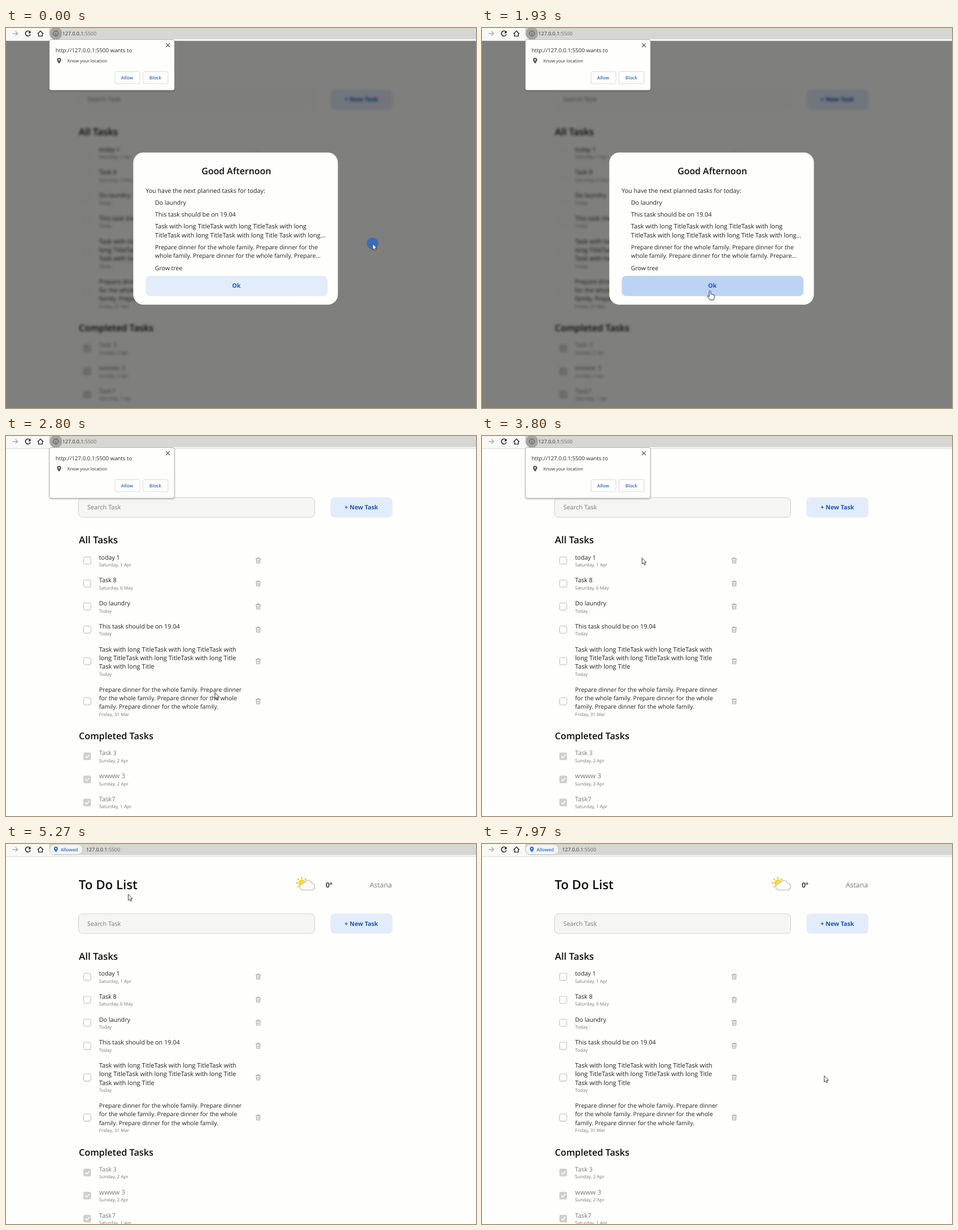
These frames come from a looping animation (832 by 673 pixels, 8000 ms). An HTML page:

```html
<!DOCTYPE html>
<html lang="en">
<head>
<meta charset="utf-8">
<title>To Do List</title>
<style>
  html, body { margin: 0; width: 100%; height: 100%; overflow: hidden; background: #fefefc; }
  svg { display: block; width: 832px; height: 673px; }
  text { font-family: "Open Sans", "Noto Sans", sans-serif; text-rendering: geometricPrecision; white-space: pre; }

  .step { animation: 8s step-end infinite; }
  .page { animation-name: blur; }
  .crisp { animation-name: crisp; }
  .modal { animation-name: modal; }
  .popup { animation-name: popup; }
  .granted { animation-name: granted; }
  .weather { animation-name: weather; }
  .title { animation-name: title; }
  .list { animation-name: list; }
  .ok { animation-name: ok; }
  .ok-text { animation-name: ok-text; }
  .allow { animation-name: allow; }
  .arrow { animation-name: arrow; }
  .hand { animation-name: hand; }
  .click { animation-name: click; }
  .cursor { animation: move 8s linear infinite; }

  @keyframes blur { 0% { filter: blur(2.2px); } 35%, to { filter: none; } }
  @keyframes crisp { 0% { opacity: .1; } 35%, to { opacity: 1; } }
  @keyframes modal { 0% { visibility: visible; } 35%, to { visibility: hidden; } }
  @keyframes popup { 0% { visibility: visible; } 62.8%, to { visibility: hidden; } }
  @keyframes granted { 0% { visibility: hidden; } 62.8%, to { visibility: visible; } }
  @keyframes weather { 0% { visibility: hidden; } 65.5%, to { visibility: visible; } }
  @keyframes title { 0% { transform: translateY(-7.3px); } 65.5%, to { transform: none; } }
  @keyframes list { 0% { transform: none; } 65.5%, to { transform: translateY(14.5px); } }
  @keyframes ok { 0% { fill: #e3ecfa; } 20.5% { fill: #bcd3f6; } 32.5%, to { fill: #3f83e8; } }
  @keyframes ok-text { 0% { fill: #1a54b8; } 32.5%, to { fill: #fff; } }
  @keyframes allow { 0% { fill: #fefefd; } 52.5%, to { fill: #e6effb; } }
  @keyframes arrow { 0% { opacity: 1; } 20.5% { opacity: 0; } 35%, to { opacity: 1; } }
  @keyframes hand { 0% { opacity: 0; } 20.5% { opacity: 1; } 35%, to { opacity: 0; } }
  @keyframes click {
    0%, 60.8% { opacity: .85; }
    .375%, 62% { opacity: .4; }
    .875%, 62.4%, to { opacity: 0; }
  }
  @keyframes move {
    0%, 6.6% { transform: translate(648.5px, 381.5px); }
    9.4% { transform: translate(570px, 240px); }
    11.25% { transform: translate(450px, 166px); }
    13.1% { transform: translate(310px, 190px); }
    14.4% { transform: translate(243px, 245px); }
    16.6% { transform: translate(285px, 288px); }
    20% { transform: translate(372px, 430px); }
    24.1%, 25.4% { transform: translate(403.5px, 465.5px); }
    27.1% { transform: translate(382px, 460px); }
    28.4%, 35.6% { transform: translate(369.5px, 454px); }
    42.1%, 44.1% { transform: translate(330px, 300px); }
    52.5% { transform: translate(214px, 92px); }
    54.1%, 74.1% { transform: translate(216px, 88.5px); }
    76.25% { transform: translate(300px, 78px); }
    78.1% { transform: translate(480px, 56px); }
    80% { transform: translate(660px, 90px); }
    80.9% { transform: translate(728px, 118px); }
    81.6%, 82.1% { transform: translate(699.5px, 103px); }
    84.1%, 85% { transform: translate(703px, 106px); }
    88.1% { transform: translate(454px, 38px); }
    91.25%, 94.6% { transform: translate(708px, 97px); }
    96.9% { transform: translate(690px, 230px); }
    98.75% { transform: translate(625px, 390px); }
    99.6%, to { transform: translate(605.5px, 410px); }
  }
</style>
</head>
<body>
<svg id="stage" viewBox="0 0 832 673" xmlns="http://www.w3.org/2000/svg"></svg>
<script>
const INK = '#1f2022', BLACK = '#0b0b0c', GREY = '#787878', BLUE = '#1a54b8', LINK = '#2f6bc9';

const text = (x, y, size, str, fill = INK, attrs = '') =>
  `<text x="${x}" y="${y}" font-size="${size}" fill="${fill}" ${attrs}>${str}</text>`;
const bold = (x, y, size, str, fill = BLACK, attrs = '') =>
  text(x, y, size, str, fill, `font-weight="600" ${attrs}`);
const rect = (x, y, w, h, r, fill, attrs = '') =>
  `<rect x="${x}" y="${y}" width="${w}" height="${h}" rx="${r}" fill="${fill}" ${attrs}/>`;
const line = (d, stroke, width, attrs = '') =>
  `<path d="${d}" fill="none" stroke="${stroke}" stroke-width="${width}" ${attrs}/>`;
const group = (cls, ...parts) => `<g class="${cls}">${parts.join('')}</g>`;

const pin = (x, y, s, fill) =>
  `<path transform="translate(${x} ${y}) scale(${s})" fill="${fill}" fill-rule="evenodd"
    d="M0 5.2C-2 2.5-3.7 .5-3.7-1.5a3.7 3.7 0 0 1 7.4 0C3.7 .5 2 2.5 0 5.2ZM0-2.9a1.4 1.4 0 1 0 0 2.8a1.4 1.4 0 1 0 0-2.8Z"/>`;

const trash = y => line(
  'M-4.3-3.2H4.3M-1.6-3.2V-4.6H1.6V-3.2M-3.4-3.2L-2.8 4.6H2.8L3.4-3.2M-1.1-1V2.7M1.1-1V2.7',
  '#858585', .8, `transform="translate(446.5 ${y})"`);

function row(y, size, lines, date, done) {
  const top = y - 1.9 - (lines.length - 1) * 7.6;
  const box = done
    ? rect(137, y - 6.7, 13.5, 13.5, 2.5, '#cfcfcd') +
      line(`M140.3 ${y}l2.6 2.7l4.7-5.3`, '#fff', 1.5)
    : group('step crisp',
      rect(137.5, y - 6.2, 12.6, 12.6, 2, '#fefefd', 'stroke="#b9bab8"'), trash(y));
  return box +
    lines.map((s, i) => text(164.8, top + i * 15.2, size, s, done ? GREY : INK)).join('') +
    text(164.8, top + (lines.length - 1) * 15.2 + 12.4, 8.1, date, GREY);
}

const rays = Array.from({ length: 8 }, (_, i) =>
  line('M0-8V-9.8', '#e6b422', 1.9, `transform="translate(523.8 69) rotate(${i * 45})" stroke-linecap="round"`)).join('');

const weather = group('step weather',
  rays,
  '<circle cx="523.8" cy="69" r="5.6" fill="#f9df1c" stroke="#ecbc24" stroke-width="1"/>',
  `<path d="M525 81.5a5.2 5.2 0 0 1-.6-10.3a5 5 0 0 1 4.5-3a6.6 6.6 0 0 1 12 .8a6.4 6.4 0 0 1 .6 12.5Z"
    fill="#fbfbfa" stroke="#cacac9" stroke-width="1.7"/>`,
  bold(566, 77.3, 12, '0°'),
  text(643.7, 77.4, 12.4, 'Astana', GREY));

const list = group('step list',
  rect(128.5, 109, 418, 35, 7, '#f5f6f3', 'class="step crisp" stroke="#cdd0c9"'),
  text(144, 130.2, 10.9, 'Search Task', GREY),
  rect(574.5, 108.7, 109.5, 35.6, 7, '#e3ecfa'),
  text(629, 130.2, 10.7, '+ New Task', BLUE, 'font-weight="700" text-anchor="middle"'),
  bold(129, 190.2, 16.9, 'All Tasks'),
  row(220.5, 10.6, ['today 1'], 'Saturday, 1 Apr'),
  row(261.3, 10.8, ['Task 8'], 'Saturday, 6 May'),
  row(302, 10.7, ['Do laundry'], 'Today'),
  row(342.8, 10.8, ['This task should be on 19.04'], 'Today'),
  row(398.8, 11.1, ['Task with long TitleTask with long TitleTask with',
    'long TitleTask with long TitleTask with long Title', 'Task with long Title'], 'Today'),
  row(469.8, 10.5, ['Prepare dinner for the whole family. Prepare dinner',
    'for the whole family. Prepare dinner for the whole',
    'family. Prepare dinner for the whole family.'], 'Friday, 31 Mar'),
  bold(129, 537, 16.2, 'Completed Tasks'),
  row(567.3, 10.8, ['Task 3'], 'Sunday, 2 Apr', true),
  row(608.1, 11.7, ['wwww 3'], 'Sunday, 2 Apr', true),
  row(648.9, 11, ['Task7'], 'Saturday, 1 Apr', true));

const page = group('step page',
  rect(-20, -20, 872, 713, 0, '#fefefc'),
  group('step title', bold(128.7, 80.2, 22.3, 'To Do List')),
  weather, list);

const items = [
  [312.8, 10.7, 'Do laundry'],
  [334, 10.8, 'This task should be on 19.04'],
  [355.4, 11.1, 'Task with long TitleTask with long TitleTask with long'],
  [370.8, 11.1, 'TitleTask with long TitleTask with long Title Task with long...'],
  [392, 10.5, 'Prepare dinner for the whole family. Prepare dinner for the'],
  [407.4, 10.5, 'whole family. Prepare dinner for the whole family. Prepare...'],
  [428.8, 10.5, 'Grow tree'],
];
const modal = group('step modal',
  rect(0, 22, 832, 651, 0, '#000', 'opacity=".5"'),
  rect(225.3, 220.5, 362.2, 269.5, 18, '#fefefc'),
  bold(407.7, 259.2, 15.9, 'Good Afternoon', BLACK, 'text-anchor="middle"'),
  text(247.2, 291.8, 10.7, 'You have the next planned tasks for today:'),
  items.map(([y, size, s]) => text(263.8, y, size, s)).join(''),
  rect(247.4, 439, 321.6, 35.7, 7.5, '#e3ecfa', 'class="step ok"'),
  text(407.8, 460.4, 10.6, 'Ok', BLUE, 'class="step ok-text" font-weight="700" text-anchor="middle"'));

const address = x => text(x, 13.2, 8.9, '127.0.0.1<tspan fill="#6b6b6b">:5500</tspan>', '#333');

const bar =
  rect(0, 0, 832, 22.5, 0, '#f8f8f6') +
  rect(76.5, -12, 800, 31.8, 11, '#d6d7d3') +
  line('M0 22.5H832', '#d9dad7', 1) +
  line('M11.5 9.8H20.5M16.7 5.8L20.7 9.8L16.7 13.8', '#a0a0a0', 1.2) +
  line('M42.3 6.8A4.5 4.5 0 1 0 43.2 11', '#222', 1.5) +
  '<path d="M43.6 4.8V9.2H39.2Z" fill="#222"/>' +
  line('M56 10.2L61 5.2L66 10.2M57.6 9.5V14.4H64.4V9.5', '#222', 1.3);

const asking = group('step popup',
  '<circle cx="88.3" cy="9.6" r="11" fill="#a5a6a3"/>',
  '<circle cx="88.3" cy="9.6" r="4.5" fill="none" stroke="#444"/>',
  line('M88.3 9V12.2M88.3 6.8V8', '#444', 1.1),
  address(99.8),
  rect(76.9, 20.5, 221.2, 89.6, 3, '#fefefd', 'stroke="#a9a9a7" stroke-width=".8" filter="url(#shadow)"'),
  line('M283.2 27.2L289.8 33.8M289.8 27.2L283.2 33.8', '#444', 1.2),
  text(87.8, 42.7, 9.7, 'http://127.0.0.1:5500 wants to', '#2a2a2a'),
  pin(94, 58, 1, '#555'),
  text(108.7, 61.3, 7.86, 'Know your location', '#2a2a2a'),
  rect(193, 77.2, 44, 21.6, 3, '#fefefd', 'class="step allow" stroke="#d8dade"'),
  rect(242.4, 77.2, 44.4, 21.6, 3, '#fefefd', 'stroke="#d8dade"'),
  bold(214.5, 90.8, 8.2, 'Allow', LINK, 'text-anchor="middle"'),
  bold(264.4, 90.8, 8.1, 'Block', LINK, 'text-anchor="middle"'));

const granted = group('step granted',
  rect(76.8, .8, 59, 18, 9, '#f3f4f2', 'stroke="#c4c5c2"'),
  pin(88.3, 9.6, .95, '#1f66d6'),
  bold(96.7, 12.7, 8, 'Allowed', LINK),
  address(141.8));

const cursor = group('cursor',
  '<circle class="step click" cx=".3" r="10.3" fill="#2f6ac6"/>',
  `<path class="step arrow" d="M.4 .5V11.4L2.9 9.1L4.6 13L6.4 12.2L4.8 8.4H8Z"
    fill="#fff" stroke="#222" stroke-width=".9"/>`,
  `<path class="step hand" d="M-1.3 1.5a1.3 1.3 0 0 1 2.7 0V6Q2.8 5.2 3.7 6.5Q5 5.8 5.9 7.1Q7.9 6.8 7.9 9V11.5Q7.6 13.5 6.6 16H-.2Q-1.5 13.6-4.7 10.3Q-4.6 8.2-2.8 9.1L-1.3 10.5Z"
    fill="#fff" stroke="#222" stroke-width="1"/>`);

document.getElementById('stage').innerHTML =
  `<defs><filter id="shadow" x="-10%" y="-10%" width="120%" height="130%">
    <feDropShadow dx="0" dy="1" stdDeviation="1.2" flood-opacity=".35"/></filter></defs>` +
  page + modal + bar + asking + granted + cursor;
</script>
</body>
</html>
```
